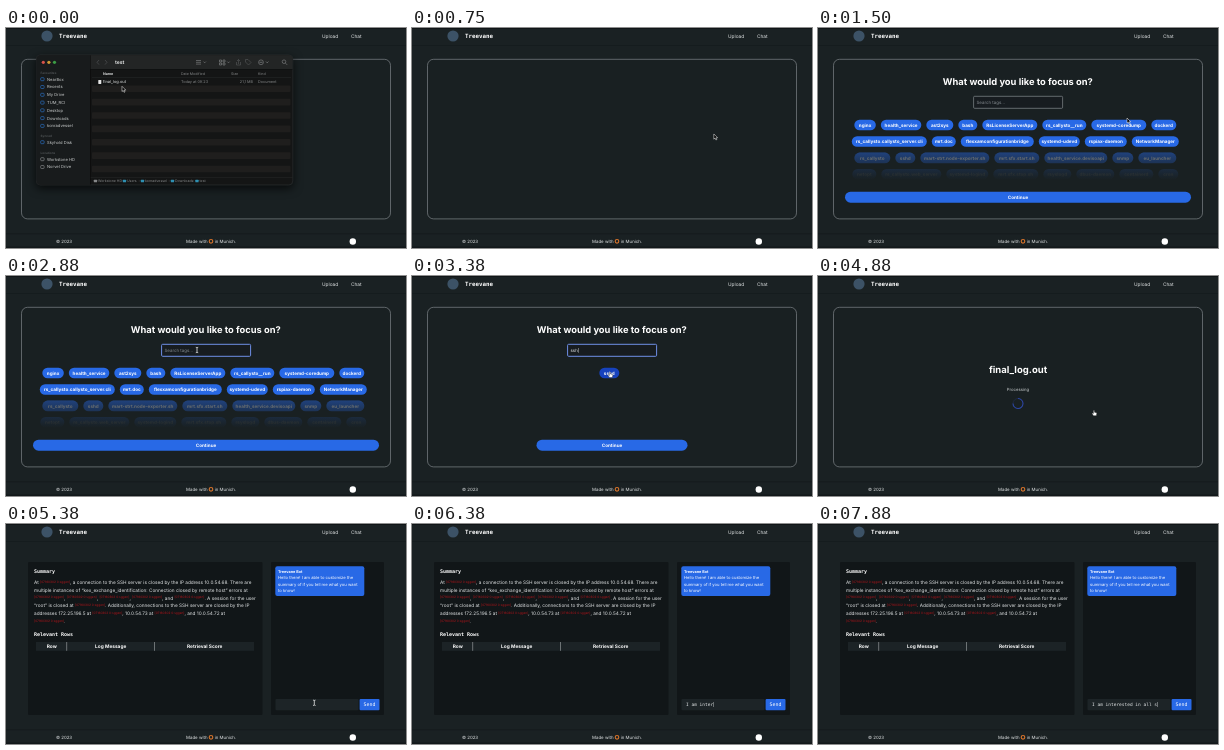
An HTML page that plays this animation: 400x220 px, repeating every 8 s.

```html
<!DOCTYPE html>
<html lang="en">
<head>
<meta charset="utf-8">
<title>Log summary demo</title>
<style>
html, body { margin: 0; height: 100%; overflow: hidden; background: #1a2123; }
svg { display: block; width: 100vw; height: 100vh; font-family: Inter, "Open Sans", sans-serif; }
.m { font-family: "DejaVu Sans Mono", monospace; }
.b { font-weight: 700; }
text { white-space: pre; text-rendering: geometricPrecision; }
.window { filter: drop-shadow(0 3px 5px #000b); }
</style>
</head>
<body>
<svg id="stage" viewBox="0 0 400 220"></svg>
<script>
const LOOP = 8000, BLUE = '#2869e6', BG = '#1a2123', LIGHT = '#e4e7e8';
const stage = document.getElementById('stage');

// y is the vertical middle of the line
const text = (x, y, s, size, fill = LIGHT, cls = '', anchor = 'start') =>
  `<text x="${x}" y="${y + size * 0.36}" font-size="${size}" fill="${fill}" class="${cls}" text-anchor="${anchor}">${s}</text>`;
const mid = (x, y, s, size, fill, cls) => text(x, y, s, size, fill, cls, 'middle');
const rect = (x, y, w, h, fill, r = 0, more = '') =>
  `<rect x="${x}" y="${y}" width="${w}" height="${h}" rx="${r}" fill="${fill}" ${more}/>`;
const dot = (x, y, r, fill, more = '') => `<circle cx="${x}" cy="${y}" r="${r}" fill="${fill}" ${more}/>`;
const line = (d, stroke, w = 0.6) => `<path d="${d}" fill="none" stroke="${stroke}" stroke-width="${w}"/>`;

const chrome =
  rect(0, 0, 400, 220, BG) + rect(0, 0, 400, 1, '#101517') +
  rect(0, 17, 400, 0.7, '#141a1c') + rect(0, 205.5, 400, 0.7, '#12181a') + rect(0, 218.5, 400, 1.5, '#12181a') +
  dot(41, 8, 5.6, '#3c5266') +
  text(53, 8.3, 'Treevane', 5.8, '#fff', 'm b') +
  text(316, 8.5, 'Upload', 4.8) + text(345, 8.5, 'Chat', 4.8) +
  text(50, 213.5, '© 2023', 4.4) + text(180, 213.5, 'Made with', 4.4) +
  dot(205, 213.3, 1.8, 'none', 'stroke="#d9742b" stroke-width="1.1"') +
  text(208.7, 213.5, 'in Munich.', 4.4) + dot(346.8, 213.5, 3.2, '#fff');

const frame = rect(15.5, 31.3, 369, 159.6, '#192022', 6, 'stroke="#7f8588" stroke-width=".7"');

function finderWindow() {
  const grey = '#858788', dim = '#565859', blue = '#2a6fc0', teal = '#2f8fb0';
  let s = rect(30.3, 27, 256.5, 130, '#141515', 4, 'stroke="#34383a" stroke-width=".5"') +
    '<path d="M84 27.3H282.6a4 4 0 0 1 4 4V41H84Z" fill="#232525"/>' +
    '<path d="M34.3 27.3H84V156.7H34.3a4 4 0 0 1-3.7-4V31a4 4 0 0 1 3.7-3.7Z" fill="#181b1c"/>' +
    rect(84, 27.3, 0.5, 129.4, '#060707') + rect(84, 41, 202.5, 0.5, '#0b0c0c');
  ['#d8524a', '#cf9a34', '#3b9c45'].forEach((c, i) => s += dot(37.3 + i * 5.6, 34.3, 1.6, c));
  s += line('M93 32l-2 2.3 2 2.3', dim) + line('M99 32l2 2.3-2 2.3', dim) +
    text(109, 34.3, 'test', 5, '#dcdede', 'b') +
    line('M190 32.5h5M190 34.3h5M190 36.1h5M197.5 33.6l1.2 1.2 1.2-1.2', grey) +
    line('M213.5 32h2v2h-2zM217 32h2v2h-2zM213.5 35h2v2h-2zM217 35h2v2h-2zM221.3 33.6l1.2 1.2 1.2-1.2', grey) +
    line('M230.5 34v3h4v-3M232.5 36v-4.5M231 33l1.5-1.5 1.5 1.5', dim) +
    line('M239.5 33v-1.5h2.5l3 3-2.5 2.5-3-3z', dim) +
    dot(255, 34.3, 2.4, 'none', `stroke="${grey}" stroke-width=".6"`) +
    line('M253.5 34.3h3M260 33.6l1.2 1.2 1.2-1.2', grey, 0.7) +
    dot(278, 33.7, 1.8, 'none', `stroke="${grey}" stroke-width=".6"`) + line('M279.4 35.1l1.8 1.8', grey);
  [['Favourites', 45], ['Synced', 107.5], ['Locations', 124.5]].forEach(([n, y]) => s += text(34.5, y, n, 3.1, '#4c5052', 'b'));
  [['NearBox', 51.2], ['Recents', 59], ['My Drive', 66.8], ['TUM_RCI', 74.6], ['Desktop', 82.3], ['Downloads', 90.1],
    ['konradvessel', 97.9], ['Skyhold Disk', 114.2], ['Workstone HD', 131.2], ['Norvel Drive', 139]].forEach(([n, y]) =>
    s += rect(34.7, y - 1.5, 3.4, 3, 'none', 0.8, `stroke="${y > 120 ? grey : blue}" stroke-width=".7"`) +
      text(41, y, n, 4.1, '#c9cccc'));
  [[97, 'Name'], [175, 'Date Modified'], [225, 'Size'], [252, 'Kind']].forEach(([x, n], i) =>
    s += text(x, 45.5, n, 3.6, i ? grey : '#dcdede', i ? '' : 'b'));
  s += rect(86, 49.2, 199, 0.4, '#2b2d2d');
  for (let i = 1; i < 14; i += 2) s += rect(86, 50.7 + i * 6.69, 198.5, 6.69, '#1f1e1d', 1);
  s += rect(92.3, 52, 3, 4, '#e5e5e5', 0.4) + text(97, 54, 'final_log.out', 4, '#e5e7e7') +
    text(175, 54, 'Today at 09:23', 3.8, grey) + text(247, 54, '21,1 MB', 3.8, grey, '', 'end') +
    text(252, 54, 'Document', 3.8, grey) + rect(84.6, 149.3, 202, 0.4, '#2b2d2d');
  [[92, 'Workstone HD'], [121, 'Users'], [139, 'konradvessel'], [169, 'Downloads'], [193.5, 'test']].forEach(([x, n], i) =>
    s += rect(x - 4.2, 151.7, 3.3, 2.6, i ? teal : grey, 0.5) + text(x, 153, n, 3.5, grey) +
      (i ? text(x - 6.4, 153, '›', 3.5, dim) : ''));
  return `<g class="window">${s}</g>`;
}

const tags = [
  ['nginx', 21.5], ['health_service', 40.5], ['ast2sys', 27], ['bash', 19], ['RsLicenseServerApp', 55],
  ['rs_callysto__run', 44], ['systemd-coredump', 55], ['dockerd', 25],
  ['rs_callysto.callysto_server.cli', 75], ['mrt.doc', 24], ['flexxamconfigurationbridge', 73],
  ['systemd-udevd', 41], ['rspiax-daemon', 42], ['NetworkManager', 47],
  ['rs_callysto', 36], ['sshd', 20], ['mart-strt.node-exporter.sh', 69], ['mrt.sfx.start.sh', 45],
  ['health_service.devisoapi', 63], ['snmp', 21], ['eu_launcher', 38],
  ['netopt', 24], ['rs_callysto.web_server', 60], ['systemd-logind', 42], ['mrt.sfx.stop.sh', 45],
  ['rsyslogd', 28], ['dbus-daemon', 38], ['containerd', 34], ['cron', 20]];

function wrapTags(query) {
  const rows = [];
  for (const tag of tags.filter(([n]) => n.includes(query))) {
    let row = rows[rows.length - 1];
    if (!row || row.width + 5 + tag[1] > 332) rows.push(row = { width: -5, items: [] });
    row.items.push(tag);
    row.width += 5 + tag[1];
  }
  return rows;
}

function focusPage(t) {
  const query = 'ssh'.slice(0, [2980, 3060, 3140].filter(k => t >= k).length);
  const focused = t >= 2700, rows = wrapTags(query);
  let s = frame + mid(199.8, 53.3, 'What would you like to focus on?', 9.35, '#fff', 'b') +
    rect(155.6, 68.3, 89, 12, '#171c20', 1, `stroke="${focused ? '#6f8fe6' : '#858b8f'}" stroke-width="${focused ? 1 : 0.7}"`) +
    text(158.5, 74.4, query || 'Search tags...', 4.4, query ? LIGHT : '#858b90');
  if (query) s += rect(158.8 + query.length * 2.45, 72, 0.4, 4.8, LIGHT);
  rows.slice(0, 4).forEach((row, i) => {
    let x = 197.3 - row.width / 2;
    const y = 97 + i * 16.45;
    for (const [name, w] of row.items) {
      s += rect(x, y - 5.3, w, 10.6, query === 'ssh' ? '#1742bd' : BLUE, 5.3) + mid(x + w / 2, y, name, 4.6, '#fff', 'b');
      x += w + 5;
    }
  });
  const w = Math.max(151, ...rows.map(r => r.width + 19));
  return s + rect(22, 116, 356, 40, 'url(#fade)') + rect(200 - w / 2, 163.7, w, 11, BLUE, 5.5) +
    mid(200, 169.2, 'Continue', 4.6, '#fff', 'b');
}

const processing = t => frame + mid(200, 93.5, 'final_log.out', 9.5, '#fff', 'b') +
  mid(200, 113.2, 'Processing', 4.25, '#c9cdcf') + dot(200, 127.5, 5, 'none', 'stroke="#1f2940" stroke-width="1"') +
  `<path d="M200 122.5a5 5 0 1 1-5 5" fill="none" stroke="#2d47a6" stroke-width="1" transform="rotate(${(t - 4880) * 0.36} 200 127.5)"/>`;

// '#' marks a row reference
const summary = ['At #, a connection to the SSH server is closed by the IP address 10.0.54.68. There are',
  'multiple instances of “kex_exchange_identification: Connection closed by remote host” errors at',
  '#, #, #, #, and #. A session for the user',
  '“root” is closed at #. Additionally, connections to the SSH server are closed by the IP',
  'addresses 172.25.196.5 at #, 10.0.54.73 at #, and 10.0.54.72 at', '#.'];
const ref = '<tspan dy="-1.2" font-size="3.15" fill="#b5141a">[07160302 0:sggen]</tspan><tspan dy="1.2">';

function richLine(s, i) {
  const parts = s.split('#');
  return text(28, 58.3 + i * 7.75, parts.join(ref) + '</tspan>'.repeat(parts.length - 1), 4.74);
}

const results = rect(22, 38, 234.5, 153, '#111618', 1) + rect(265, 38, 113, 153, '#111618', 1) +
  text(28, 47.3, 'Summary', 5, '#fff', 'm b') + summary.map(richLine).join('') +
  text(28, 110.5, 'Relevant Rows', 5, '#fff', 'm b') +
  rect(30, 118, 218, 8.8, '#1c2326') + rect(60.5, 118, 0.6, 8.8, '#a4a8aa') + rect(148.4, 118, 0.6, 8.8, '#a4a8aa') +
  mid(45.7, 122.4, 'Row', 4.8, '#fff', 'b') + mid(104.7, 122.4, 'Log Message', 4.8, '#fff', 'b') +
  mid(198.7, 122.4, 'Retrieval Score', 4.8, '#fff', 'b') +
  rect(269.3, 42.3, 89, 29.8, BLUE, 2) + text(272, 47.5, 'Treevane Bot', 3.8, '#fff', 'b') +
  ['Hello there! I am able to customize the', 'summary of if you tell me what you want', 'to know!']
    .map((s, i) => text(272, 53.8 + i * 6.5, s, 4.18, '#fff')).join('') +
  rect(269.5, 175, 83, 11.3, '#1d2427', 1) + rect(353.6, 175, 19.9, 11.3, BLUE, 1) + mid(363.5, 180.6, 'Send', 4.9, '#fff', 'm');

// interpolation between [time, ...values] keys
function track(keys, t, ease = k => k) {
  let i = keys.findIndex(k => k[0] > t);
  if (i < 0) return keys[keys.length - 1].slice(1);
  if (!i) return keys[0].slice(1);
  const a = keys[i - 1], b = keys[i], k = ease((t - a[0]) / (b[0] - a[0]));
  return a.slice(1).map((v, j) => v + (b[j + 1] - v) * k);
}

function resultsPage(t) {
  const n = Math.floor(track([[5500, 0], [6300, 10], [6400, 10], [6880, 18], [7700, 23], [7830, 24]], t)[0]);
  const caret = t > 5450 ? rect(274.2 + n * 2.71, 178, 0.4, 5, LIGHT) : '';
  return results + text(274, 180.6, 'I am interested in all s'.slice(0, n), 4.5, LIGHT, 'm') + caret;
}

const pointers = {
  arrow: '<path d="M0 0v5.2l1.2-1.1.9 1.9.9-.4-.9-1.8h1.7z" fill="#000" stroke="#fff" stroke-width=".5"/>',
  beam: '<path d="M-1.2-2.7q1.2 0 1.2.8q0-.8 1.2-.8M0-1.9v3.8M-1.2 2.7q1.2 0 1.2-.8q0 .8 1.2.8" fill="none" stroke="#fff" stroke-width=".7"/>',
  hand: '<path d="M-.6-1.5q.6-.8 1.1 0v1.5l1.9.5q.5.2.4.9l-.5 2.1h-2.8l-1.5-2.1q.1-.7.8-.4l.6.4z" fill="#fff" stroke="#222" stroke-width=".4"/>'
};
const path = [[0, 116, 58.3], [200, 116, 58.3], [650, 300, 110], [1000, 309, 90], [1880, 309, 90], [2630, 191, 74],
  [3100, 191, 74], [3340, 198, 98], [3630, 198, 98], [4080, 270, 169], [4380, 270, 169], [4750, 276, 136.2],
  [5130, 276, 136.2], [5420, 310, 181]];

function pointer(t) {
  if (t > 5550) return '';
  const [x, y] = track(path, t, k => k * k * (3 - 2 * k));
  const shape = t < 2500 ? 'arrow' : t < 3250 ? 'beam' : t < 5150 ? 'hand' : t < 5380 ? 'arrow' : 'beam';
  return `<g transform="translate(${x} ${y})">${pointers[shape]}</g>`;
}

const fade = `<defs><linearGradient id="fade" x2="0" y2="1">` +
  [[0, 0], [0.18, 0], [0.22, 0.55], [0.48, 0.74], [0.62, 0.86], [0.9, 1], [1, 1]]
    .map(([o, a]) => `<stop offset="${o}" stop-color="#192022" stop-opacity="${a}"/>`).join('') + '</linearGradient></defs>';
const finder = finderWindow();

function page(t) {
  if (t < 630) return frame + finder;
  if (t < 880) return frame;
  if (t < 4380) return focusPage(t);
  return t < 5060 ? processing(t) : resultsPage(t);
}

function draw(now) {
  const t = now % LOOP;
  stage.innerHTML = fade + chrome + page(t) + pointer(t);
  requestAnimationFrame(draw);
}
requestAnimationFrame(draw);
</script>
</body>
</html>
```
